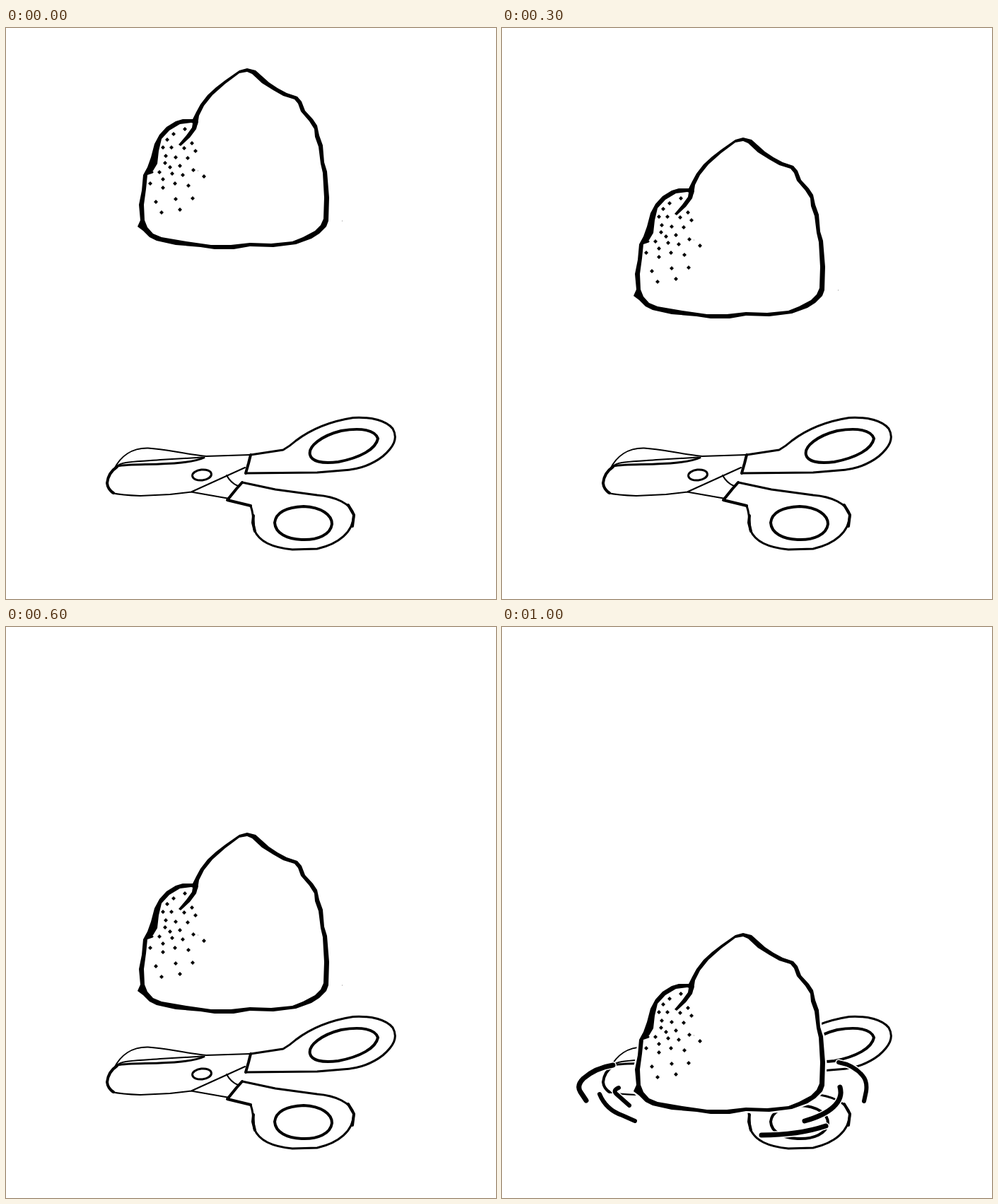
These frames come from a looping animation (693x808 px, 1500 ms). An HTML page:

```html
<!DOCTYPE html>
<html lang="en">
<head>
<meta charset="utf-8">
<title>Rock beats scissors</title>
<style>
  html, body { margin: 0; width: 100%; height: 100%; overflow: hidden; background: #fff; }
  svg { display: block; width: 100%; height: 100%; }
  .line { fill: none; stroke: #000; stroke-width: 3; stroke-linecap: round; stroke-linejoin: round; }
  .thin { stroke-width: 2; }
  .bold { stroke-width: 4; }
  .halo { stroke: #fff; stroke-width: 5; stroke-linejoin: round; }
</style>
</head>
<body>
<svg viewBox="0 0 693 808">
  <g id="scissors" class="line">
    <!-- blades -->
    <path class="thin" d="M153 624C162 606 178 594 201 594.500C227 596 247 602 283 606L345 604"/>
    <path class="thin" d="M157 620C163 613 184 614 218 611L278 607.500"/>
    <path d="M157 620C178 616 211 619 248 615Q269 613 280 608"/>
    <path class="thin" d="M150 658Q163 661 190 662L232 660L262 656.500L338 622M262 656.500L316 666M312 633Q318 644 328 648"/>
    <path class="bold" d="M157 621C148 627 144 634 143 644Q144 653 152 658"/>
    <ellipse cx="277" cy="632.500" rx="13.500" ry="7.500" transform="rotate(-6 277 632.500)"/>
    <!-- upper handle -->
    <path class="bold" d="M346 604L343 616L339 630"/>
    <path d="M346 604L392 597Q401 592 410 584C435 565 462 556 491 551.500C518 550 538 556 547 567C555 581 548 593 533 606C515 620 496 625 476 626L440 629L339 630"/>
    <path class="bold" d="M430 604C427 592 446 577 474 570C503 565 522 569 526 581C523 596 501 608 470 614C446 617 432 613 430 604Z"/>
    <!-- lower handle -->
    <path class="bold" d="M334 643L326 652L313 668L346 676"/>
    <path d="M334 643L381 653L440 661C466 663 488 673 492 689C491 713 471 730 440 737L405 738C376 735 358 727 351 710Q350 687 346 676"/>
    <path class="bold" d="M484 675L492 689L490 705M352 712L349 700L350 690"/>
    <path class="bold" d="M380 700C382 684 398 678 421 677C446 678 461 689 461 702C459 717 441 725 418 724C397 723 381 715 380 700Z"/>
  </g>

  <g id="rock">
    <path id="shade" class="halo" fill="#fff"/>
    <path id="outline" fill-rule="evenodd"/>
    <path d="M265 129L272 132L269 143L260 155L247 167L244 165L255 152L263 141Z"/>
    <path id="dots"/>
    <path d="M201 206L207 204" class="line"/>
    <path d="M271 202h1M475 273h1" stroke="#888"/>
  </g>

  <g id="impact" class="line"></g>
</svg>
<script>
  const el = id => document.getElementById(id);

  const outer = "M341 57L353 60L372 77L384 85L397 92L412 97L418 104L423 117L434 129L440 138" +
    "L443 152L448 166L450 190L454 203L457 240L456 273L453 281L443 291L432 298L410 306L378 310" +
    "L345 309L322 313L295 313L275 310L240 307L213 301L203 296L194 287L186 281L190 272L188 250" +
    "L192 230L194 208L200 197L205 183L210 164L217 151L227 140L240 132L250 129L264 129L269 119" +
    "L275 108L285 95L297 84L310 74L330 60Z";
  const inner = "M341 62L348 65L362 78L378 88L392 96L408 101L413 107L417 118L429 132L436 143" +
    "L437 154L442 168L445 192L448 205L450 240L449 270L445 279L437 287L420 296L405 302L375 305" +
    "L345 304L318 307L290 307L255 302L220 296L208 291L200 282L196 272L195 250L198 228L200 208" +
    "L208 202L214 192L216 174L220 157L231 145L246 136L262 134L271 137L273 124L280 110L292 95" +
    "L310 79L330 64Z";
  el("shade").setAttribute("d", outer);
  el("outline").setAttribute("d", outer + inner);

  const dots = [
    [253, 143], [237, 150], [228, 158], [263, 163], [222, 169], [234, 169], [252, 170],
    [268, 174], [226, 181], [240, 183], [257, 184], [225, 191], [246, 195], [232, 197],
    [265, 201], [217, 204], [235, 206], [250, 208], [280, 210], [222, 214], [204, 220],
    [239, 220], [258, 223], [222, 226], [240, 242], [264, 241], [212, 246], [246, 257], [220, 261]
  ];
  el("dots").setAttribute("d", dots.map(([x, y]) => `M${x - 3} ${y}l3 -3l3 3l-3 3z`).join(""));

  const strokes = [
    ["M157 620Q132 624 115 639Q105 649 111 658L119 670", 7],
    ["M138 661Q147 683 170 691L188 699", 6],
    ["M165 652Q156 656 162 661L180 677", 6],
    ["M476 616Q498 620 510 635Q517 643 515 657L512 671", 6],
    ["M478 651C484 672 464 689 428 699", 7],
    ["M367 719C402 719 431 715 458 706", 7]
  ];
  el("impact").innerHTML = strokes.map(([d, w]) =>
    `<path d="${d}" stroke="#fff" stroke-width="${w + 3}"/><path d="${d}" stroke-width="${w}"/>`).join("");

  // Rock drop in pixels, one entry per 100 ms step; it rests on the last.
  const drop = [0, 27, 55, 98, 141, 187, 234, 282, 329, 376];

  function draw(now) {
    const step = Math.floor(now % 1500 / 100);
    el("rock").setAttribute("transform", `translate(0 ${drop[Math.min(step, 9)]})`);
    el("impact").style.display = step < 10 ? "none" : "";
    requestAnimationFrame(() => draw(performance.now() - start));
  }
  const start = performance.now();
  draw(0);
</script>
</body>
</html>
```
